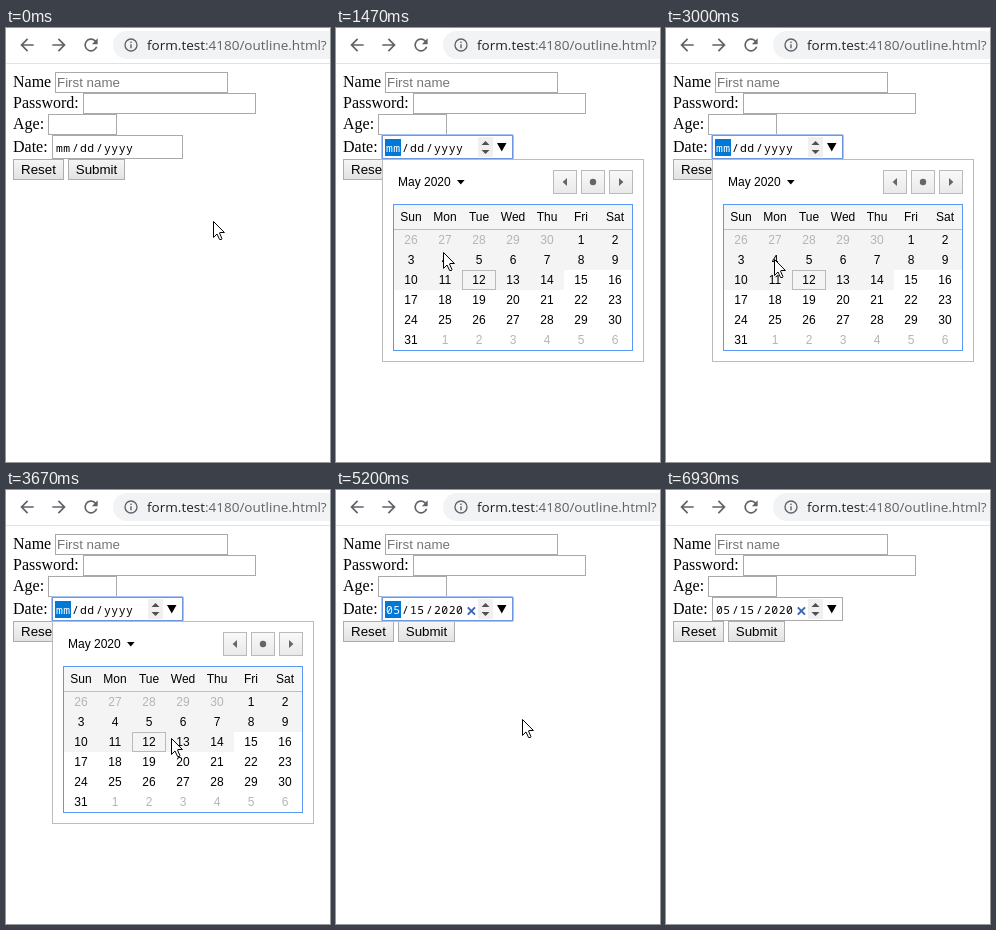
These frames come from a looping animation (324x434 px, 6.99 s). An HTML page:

```html
<!DOCTYPE html>
<html lang="en">
<head>
<meta charset="utf-8">
<title>Date picker</title>
<style>
html, body { margin: 0; width: 100%; height: 100%; overflow: hidden; background: #fff; }
svg { display: block; width: 100%; height: 100%; }
text { white-space: pre; }
.ui { font: 13.333px "Liberation Sans", Arial, sans-serif; }
.cal { font: 12px "Liberation Sans", Arial, sans-serif; }
.label { font: 16px "Liberation Serif", "Times New Roman", serif; }
.mono { font: 11.4px "Noto Sans Mono", monospace; letter-spacing: .5px; }
.url { font: 13.5px "Open Sans", sans-serif; }
.mid { text-anchor: middle; }
</style>
</head>
<body>
<svg id="stage" viewBox="0 0 324 434" xmlns="http://www.w3.org/2000/svg"></svg>
<script>
const LOOP = 6990;
const OPEN = 870, PICK = 4800, BLUR = 6930, LEAVE = 6530;

const text = (x, y, str, cls, fill = '#000') =>
  `<text x="${x}" y="${y}" class="${cls}" fill="${fill}">${str}</text>`;
const fill = (x, y, w, h, color, extra = '') =>
  `<rect x="${x}" y="${y}" width="${w}" height="${h}" fill="${color}" ${extra}/>`;
const box = (x, y, w, h, stroke, bg = '#fff', extra = '') =>
  fill(x + .5, y + .5, w - 1, h - 1, bg, `stroke="${stroke}" ${extra}`);
const shape = (d, color, extra = '') => `<path d="${d}" fill="${color}" ${extra}/>`;
const line = (d, color, w) => `<path d="${d}" fill="none" stroke="${color}" stroke-width="${w}"/>`;
const group = (id, body) => `<g id="${id}">${body}</g>`;
const gradient = (id, top, bottom) =>
  `<linearGradient id="${id}" x2="0" y2="1"><stop stop-color="${top}"/><stop offset="1" stop-color="${bottom}"/></linearGradient>`;

function toolbar() {
  const ink = '#5f6368';
  const icon = (x, d, flip = 1) =>
    shape(d, ink, `transform="translate(${x} 17) scale(${flip * 5 / 6} ${5 / 6})"`);
  const arrow = 'M8-1H-4.2L1.4-6.6 0-8-8 0 0 8 1.4 6.6-4.2 1H8z';
  const reload = 'M5.65-5.65A8 8 0 1 0 7.73 2H5.65A6 6 0 1 1 4.22-4.22L1-1H8V-8z';
  return fill(107, 3, 260, 28, '#f1f3f4', 'rx="14"') +
    fill(0, 35, 324, 1, '#e0e2e5') +
    icon(21, arrow) + icon(53, arrow, -1) + icon(85, reload) +
    `<circle cx="125" cy="17" r="6" fill="none" stroke="${ink}" stroke-width="1.35"/>` +
    fill(124.3, 16.3, 1.4, 4, ink) + fill(124.3, 13.6, 1.4, 1.4, ink) +
    `<text x="141" y="22" class="url" fill="#202124">form.test<tspan fill="${ink}">:4180/outline.html?</tspan></text>`;
}

const button = (id, x, w, label) =>
  box(x, 131, w, 21, '#adadad', 'url(#face)', `id="${id}"`) +
  text(x + w / 2, 146, label, 'ui mid');

function form() {
  const edge = '#a9a9a9';
  return text(7, 59, 'Name', 'label') + box(49, 44, 173, 21, edge) +
    text(51, 59, 'First name', 'ui', '#757575') +
    text(7, 80, 'Password:', 'label') + box(77, 65, 173, 21, edge) +
    text(7, 101, 'Age:', 'label') + box(42, 86, 69, 21, edge) +
    text(7, 124, 'Date:', 'label') + box(46, 107, 131, 24, edge) +
    button('reset', 7, 51, 'Reset') + button('submit', 62, 57, 'Submit');
}

function dateField() {
  const part = (id, x) => `<text id="${id}" x="${x}" y="124" class="mono"></text>`;
  return group('focus',
      box(45, 106, 133, 26, '#a8c6f5', 'none', 'rx="1"') +
      box(46, 107, 131, 24, '#6c97de', 'none') +
      fill(49, 111, 16, 17, '#0078d7')) +
    part('month', 50) + text(66, 124, '/', 'mono') + part('day', 74) +
    text(90, 124, '/', 'mono') + part('year', 98) +
    group('clear', line('M131.8 117.4l7.2 7.2M139 117.4l-7.2 7.2', '#3b66b5', 2)) +
    group('spinner',
      fill(142, 109, 15, 20, '#f0f0f0') +
      shape('M145.5 117l4-4 4 4zM145.5 122l4 4 4-4z', '#505050') +
      shape('M161 115h9.5l-4.75 8.5z', '#000'));
}

function calendar() {
  const col = i => 75 + 34 * i;
  let out = box(46, 131, 262, 203, '#bcbcbc') +
    text(62, 158, 'May 2020', 'cal') + shape('M121 152h7.6l-3.8 4.6z', '#000');
  for (const x of [217, 245, 273]) out += box(x, 142, 24, 24, '#bababa', 'url(#navFace)');
  out += shape('M231 150v8l-4.4-4zM283 150v8l4.4-4z', '#666') +
    '<circle cx="257" cy="154" r="3.2" fill="#666"/>' +
    fill(58, 177, 238, 24, '#f5f5f5') + fill(58, 201, 238, 1, '#bfbfbf') +
    fill(58, 202, 238, 40, '#f4f4f4') + fill(58, 242, 170, 20, '#f4f4f4') +
    box(126, 242, 34, 20, '#bababa', '#f4f4f4') +
    fill(228, 242, 34, 20, '#e1e9f6', 'id="hover"');
  'Sun Mon Tue Wed Thu Fri Sat'.split(' ').forEach((name, i) => {
    out += text(col(i), 193, name, 'cal mid');
  });
  for (let i = 0; i < 42; i++) {
    const n = i - 4, inside = n > 0 && n < 32;
    const label = n < 1 ? n + 30 : n > 31 ? n - 31 : n;
    out += text(col(i % 7), 216 + 20 * Math.floor(i / 7), label, 'cal mid', inside ? '#000' : '#b5b5b5');
  }
  return out + box(57, 176, 240, 147, '#5b97f5', 'none');
}

const stage = document.getElementById('stage');
stage.innerHTML =
  `<defs>${gradient('face', '#f5f5f5', '#e2e2e2')}${gradient('navFace', '#f9f9f9', '#e9e9e9')}</defs>` +
  toolbar() + form() + dateField() + group('calendar', calendar()) +
  group('cursor', shape('M.5 .5V16.4L4 13l2.6 5.5H8.5l.4-1L6.5 12l.4-.5H11.4Z', '#fff', 'stroke="#000"'));

const el = {};
stage.querySelectorAll('[id]').forEach(node => el[node.id] = node);

// Pointer stops: time, x, y
const stops = [
  [0, 207, 193], [330, 138, 118], [470, 138, 118], [670, 165, 119],
  [870, 165, 119], [1200, 150, 165], [1470, 107, 224], [1800, 209, 228],
  [1930, 189, 224], [2200, 166, 239], [2530, 140, 251], [2670, 140, 251],
  [2800, 99, 234], [2930, 99, 234], [3130, 125, 226], [3400, 170, 238],
  [3530, 156, 248], [3600, 156, 248], [3670, 165, 248], [3730, 179, 248],
  [3800, 179, 248], [4530, 239, 248], [4800, 236, 249], [5200, 186, 229],
  [5330, 194, 240], [5730, 150, 109], [6000, 100, 141], [6470, 133, 408]
];

function pointer(t) {
  const i = stops.findIndex(s => s[0] > t);
  if (i < 0) return stops[stops.length - 1].slice(1);
  const [t0, x0, y0] = stops[i - 1], [t1, x1, y1] = stops[i];
  const k = (t - t0) / (t1 - t0);
  return [x0 + (x1 - x0) * k, y0 + (y1 - y0) * k].map(Math.round);
}

const show = (node, on) => node.style.display = on ? '' : 'none';

function render(now) {
  // The screen refreshes fifteen times a second, on 10 ms ticks
  const step = Math.floor((now % LOOP + 4) * .015);
  const t = Math.round(step / .15) * 10;
  const [x, y] = pointer(t);
  const over = (l, top, r, b) => x >= l && x < r && y >= top && y < b;
  const focused = t >= OPEN && t < BLUR;
  const picked = t >= PICK;

  el.cursor.setAttribute('transform', `translate(${x} ${y})`);
  show(el.cursor, t < LEAVE);
  show(el.calendar, t >= OPEN && !picked);
  show(el.hover, over(228, 242, 262, 262));
  show(el.focus, focused);
  show(el.spinner, t >= OPEN || over(46, 107, 177, 131));
  show(el.clear, picked);
  el.month.textContent = picked ? '05' : 'mm';
  el.day.textContent = picked ? '15' : 'dd';
  el.year.textContent = picked ? '2020' : 'yyyy';
  el.month.setAttribute('fill', focused ? '#fff' : '#000');
  el.submit.setAttribute('stroke', over(62, 131, 119, 152) ? '#7a7a7a' : '#adadad');
}

const start = performance.now();
function tick() {
  render(performance.now() - start);
  requestAnimationFrame(tick);
}
tick();
</script>
</body>
</html>
```
